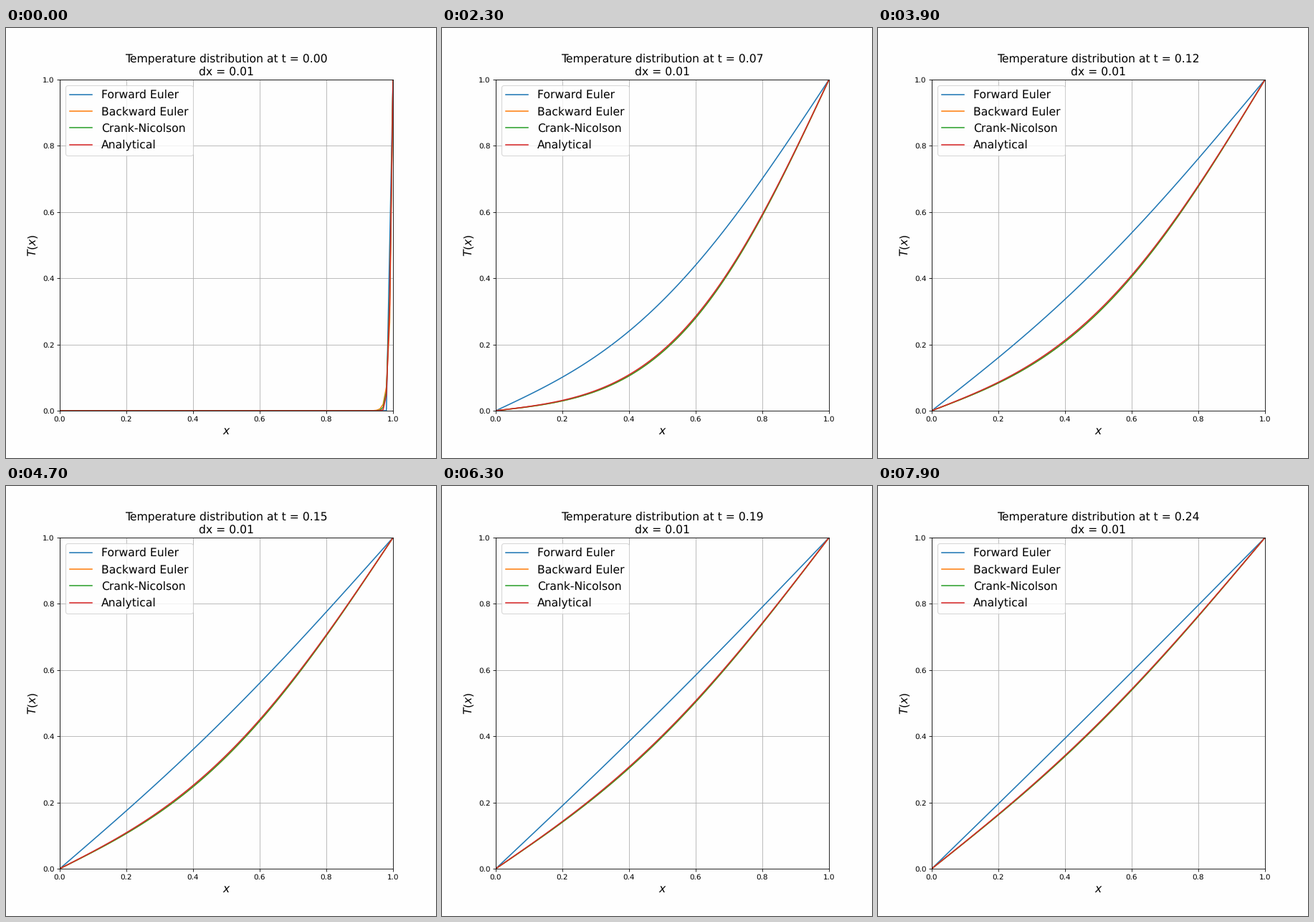
Write a matplotlib script that moves like this. It is 600x600 px and loops after 8 s.

```python
import numpy as np
import matplotlib.pyplot as plt
from matplotlib.animation import FuncAnimation

FRAMES, INTERVAL = 80, 100
N, DX = 100, 0.01            # interior points, grid step
R = 0.5                      # dt / dx^2
DT = R * DX**2
STEPS = 20                   # time steps per tick of 0.001

x = np.linspace(0, 1, N + 2)


def tick(k):
    """Simulation tick shown: the start, then every third one."""
    return 3 * k + 1 if k else 0


def inner(offset):
    """Shift matrix whose boundary rows are zero."""
    m = np.eye(N + 2, k=offset)
    m[[0, -1]] = 0
    return m


I, D, L, U = np.eye(N + 2), inner(0), inner(-1), inner(1)
K = 2 * D - L - U

# One-step operators; the explicit scheme is updated in place, left to right.
schemes = {
    "Forward Euler": np.linalg.solve(I - R * L, I - 2 * R * D + R * U),
    "Backward Euler": np.linalg.inv(I + R * K),
    "Crank-Nicolson": np.linalg.solve(I + R / 2 * K, I - R / 2 * K),
}


def evolve(step):
    u = np.zeros(N + 2)
    u[-1] = 1
    states = [step @ u]
    jump = np.linalg.matrix_power(step, STEPS)
    for _ in range(tick(FRAMES - 1)):
        states.append(jump @ states[-1])
    return [states[tick(k)] for k in range(FRAMES)]


n = np.arange(1, 401)[:, None]
modes = 2 * (-1.0)**n / (n * np.pi) * np.sin(n * np.pi * x)


def analytical(t):
    return x + (modes * np.exp(-(n * np.pi)**2 * t)).sum(axis=0)


curves = {name: evolve(step) for name, step in schemes.items()}
curves["Analytical"] = [analytical((STEPS * tick(k) + 1) * DT)
                        for k in range(FRAMES)]

plt.rcParams["text.hinting"] = "none"
fig, ax = plt.subplots(figsize=(8, 8), dpi=75)
fig.set_facecolor("#fefefe")
ax.set_facecolor("#fefefe")
lines = {name: ax.plot(x, u[0], label=name)[0] for name, u in curves.items()}
ax.set(xlim=(0, 1), ylim=(0, 1))
ax.grid(True)
ax.set_xlabel("$x$", fontsize=15)
ax.set_ylabel("$T(x)$", fontsize=15)
ax.legend(loc="upper left", fontsize=15)
title = ax.set_title("", fontsize=15)


def update(k):
    for name, line in lines.items():
        line.set_ydata(curves[name][k])
    t = -(-tick(k) // 10) / 100     # rounded up to hundredths
    title.set_text(f"Temperature distribution at t = {t:.2f}\ndx = {DX}")
    return [*lines.values(), title]


anim = FuncAnimation(fig, update, frames=FRAMES, interval=INTERVAL,
                     repeat=True, repeat_delay=0)
plt.show()
```
